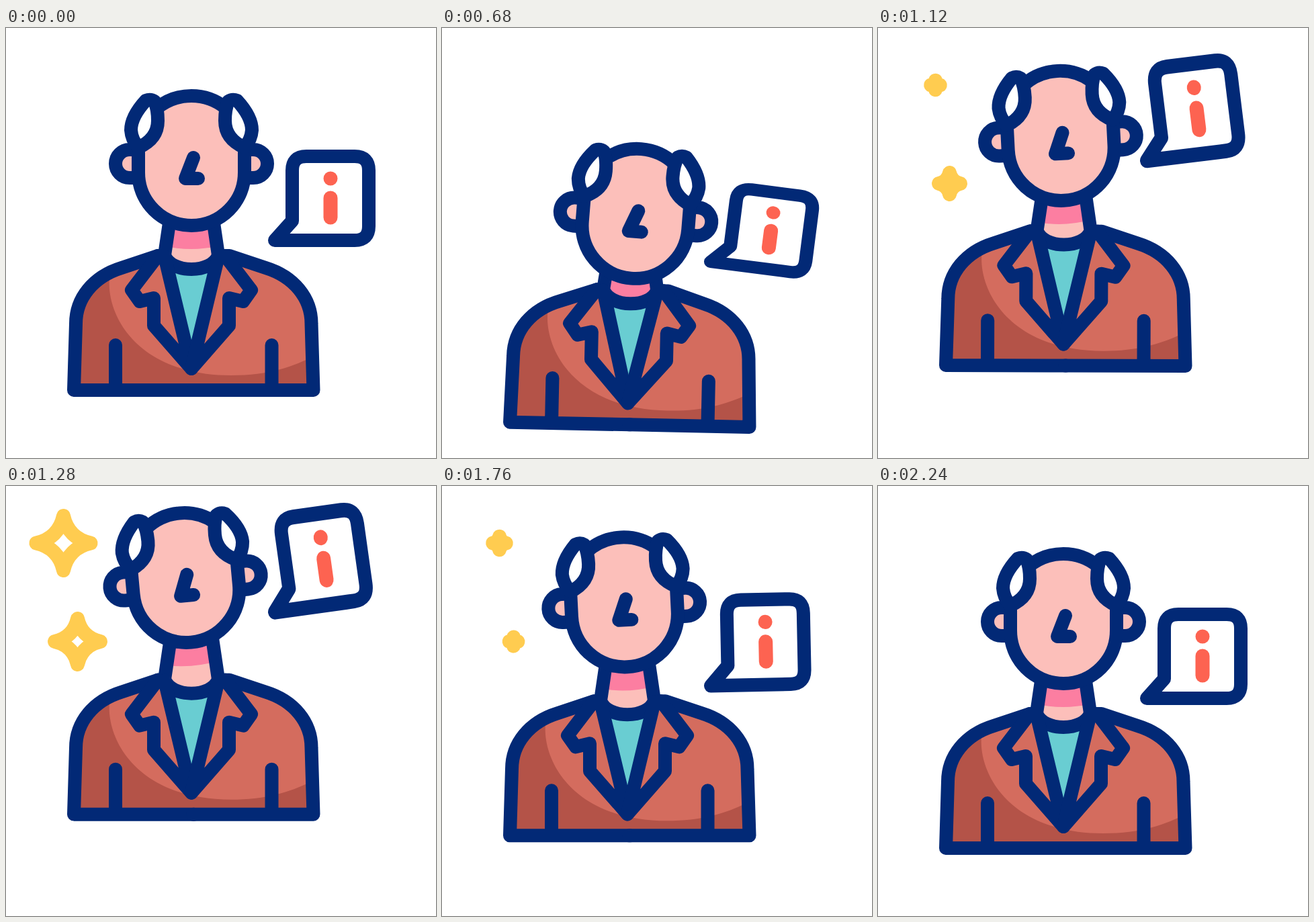
An HTML page for the animation above (2400 ms loop, 640 by 640 pixels).

```html
<!DOCTYPE html>
<html lang="en">
<head>
<meta charset="utf-8">
<title>Man with info bubble</title>
<style>
  html, body { margin: 0; height: 100%; overflow: hidden; background: #fff; }
  svg { display: block; width: 100vw; height: 100vh; }
  .line { fill: none; stroke: #022976; stroke-width: 20; stroke-linecap: round; stroke-linejoin: round; }
  .white { fill: #fff; }
  .skin { fill: #fcbfba; }
  .coat { fill: #d46c5e; }
  .dark { fill: #b45348; }
  .shirt { fill: #69cdd2; }
  .pink { fill: #fc7ea1; }
  .red { fill: #fd6351; }
  .star { fill: none; stroke: #ffcc50; stroke-width: 21; stroke-linejoin: round; vector-effect: non-scaling-stroke; }
</style>
</head>
<body>
<svg viewBox="0 0 640 640">
  <defs>
    <path id="neck" d="M246 270H306L316 338C307 366 245 366 236 338Z"/>
    <clipPath id="neckClip"><use href="#neck"/></clipPath>
    <path id="half" d="M280 339H226L172 357C130 370 104 402 104 440L101 539H280M163 472V539"/>
    <g id="jacket">
      <use href="#half"/>
      <use href="#half" transform="matrix(-1 0 0 1 558.500 0)"/>
    </g>
    <path id="lapel" class="line" d="M236 340L276 507L220 443V402L199 407L187 390L226 339"/>
    <path id="ear" class="line skin" d="M197 181H184a21 21 0 0 0 0 42H197"/>
    <path id="hair" class="line white"
      d="M208 108Q186 132 186 152Q187 166 197 178Q226 165 226 138Q226 120 221 109Q215 105 208 108Z"/>
    <path id="spark" class="star" d="M0-1Q.18-.18 1 0Q.18 .18 0 1Q-.18 .18-1 0Q-.18-.18 0-1Z"/>
  </defs>

  <use id="bigStar" href="#spark"/>
  <use id="smallStar" href="#spark"/>

  <g id="bubble">
    <path class="line white" d="M400 316L426 287V212Q426 191 447 191H519Q540 191 540 212V295Q540 316 519 316Z"/>
    <circle class="red" cx="483" cy="224" r="10.500"/>
    <rect class="red" x="472.500" y="242.500" width="21" height="50" rx="10.500"/>
  </g>

  <g id="body">
    <use href="#jacket" class="coat"/>
    <path class="dark" d="M155 365C145 420 190 517 335 517C385 517 420 507 455 490V539H101L104 440C104 402 130 372 155 365Z"/>
    <use href="#jacket" class="line"/>
    <path class="shirt" d="M237 345H315L276 507Z"/>
    <use href="#neck" class="skin"/>
    <g clip-path="url(#neckClip)">
      <path id="shade" class="pink" d="M226 250H326V322Q276 336 226 322Z"/>
    </g>
    <use href="#neck" class="line"/>
    <use href="#lapel"/>
    <use href="#lapel" transform="matrix(-1 0 0 1 552 0)"/>
    <g id="head">
      <use href="#ear"/>
      <use href="#ear" transform="matrix(-1 0 0 1 552 0)"/>
      <path class="line skin" d="M197 180V215A79 79 0 0 0 355 215V180L327 119A81 81 0 0 0 225 119Z"/>
      <use href="#hair"/>
      <use href="#hair" transform="matrix(-1 0 0 1 552 0)"/>
      <path class="line" d="M279 193L267 224H286"/>
    </g>
  </g>
</svg>
<script>
const LOOP = 2400, STEP = 40;

// Cubic bezier ease (.4, 0, .4, 1) from 0 to 1, starting at a time and lasting a length.
function leg(t, start, length) {
  const u = Math.min(1, Math.max(0, (t - start) / length));
  let lo = 0, hi = 1;
  for (let i = 0; i < 20; i++) {
    const s = (lo + hi) / 2;
    if (1.2 * s * (1 - s) + s ** 3 < u) lo = s; else hi = s;
  }
  return hi * hi * (3 - 2 * hi);
}

// Dip, rise, then settle; returns a mixer of the dip value and the rise value.
function swing(t, dip, rise, settle, dipLength = 540) {
  const risen = leg(t, rise, 540);
  const low = leg(t, dip, dipLength) - risen;
  const high = risen - leg(t, settle, 790);
  return (a, b) => a * low + b * high;
}

const place = (id, transform) => document.getElementById(id).setAttribute("transform", transform);

function placeStar(id, x, y, size) {
  place(id, `translate(${x} ${y}) scale(${size})`);
  document.getElementById(id).style.display = size > 0.5 ? "" : "none";
}

function draw(t) {
  const body = swing(t, 200, 760, 1370);
  place("body", `translate(0 ${body(52, -50.5)}) rotate(${body(1.2, 0)} 279 539)`);

  const head = swing(t, 260, 820, 1430);
  const pose = `translate(${head(6.5, -9.3)} ${head(29, -11.5)}) rotate(${head(3.6, -5.5)} 276 202)`;
  place("head", pose);
  place("shade", pose);

  // The bubble stretches as it tilts back.
  const bubble = swing(t, 200, 710, 1240, 400);
  const tilt = bubble(7.3, -8);
  place("bubble", `translate(400 ${316 + bubble(32, -129)}) rotate(${tilt}) scale(1 ${1 - tilt * 0.0115}) translate(-400 -316)`);

  const fade = leg(t, 1560, 320);
  placeStar("bigStar", 85.5, 85, 54.5 * (leg(t, 1020, 460) - fade));
  placeStar("smallStar", 106.5, 231.5, 35.5 * (leg(t, 960, 400) - fade));
}

const start = performance.now();
function frame() {
  const t = (performance.now() - start) % LOOP;
  draw(Math.floor(t / STEP) * STEP);
  requestAnimationFrame(frame);
}
frame();
</script>
</body>
</html>
```
